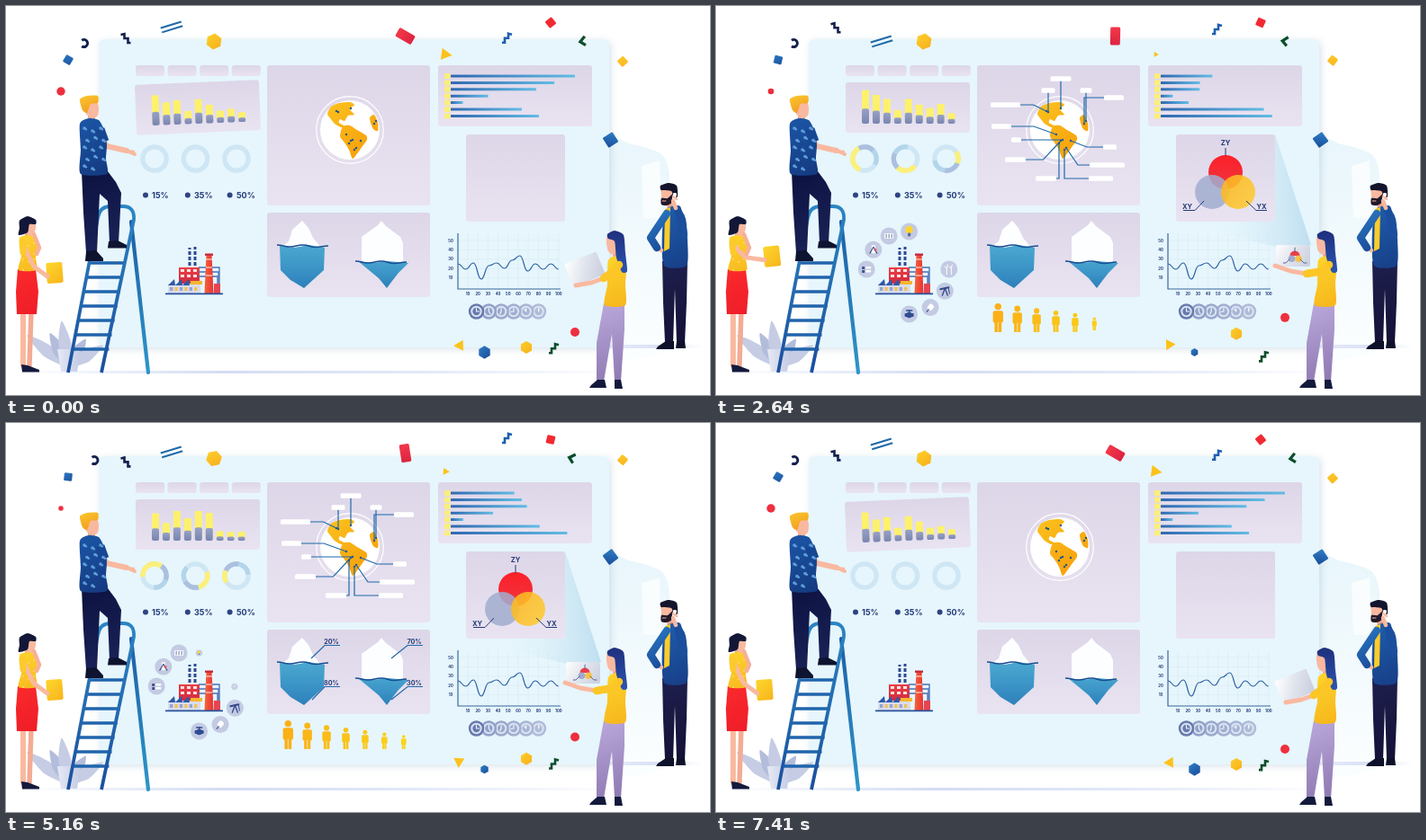
Write an HTML page with a canvas that moves like this. It is 782 px wide and 433 px high and loops after 7.44 s.

```html
<!DOCTYPE html>
<html lang="en">
<head>
<meta charset="utf-8">
<title>Data dashboard</title>
<style>
html, body { margin: 0; width: 100%; height: 100%; overflow: hidden; background: #fff; }
canvas { display: block; width: 782px; height: 433px; }
</style>
</head>
<body>
<canvas id="stage"></canvas>
<script>
const W = 782, H = 433, LOOP = 7440, TAU = Math.PI * 2, RAD = Math.PI / 180;
const canvas = document.getElementById('stage');
const dpr = window.devicePixelRatio || 1;
canvas.width = W * dpr;
canvas.height = H * dpr;
const c = canvas.getContext('2d');
const NAVY = '#243a78', SKIN = '#f9b9a0', LINE = '#1f69a8';

// ---- timing ----
const clamp = x => Math.max(0, Math.min(1, x));
const smooth = x => { x = clamp(x); return x * x * (3 - 2 * x); };
const ramp = (t, a, d) => smooth((t - a) / d);
const pulse = (t, a, da, b, db) => ramp(t, a, da) * (1 - ramp(t, b, db));
const wave = (t, mid, amp, peak = 0, turns = 1) => mid + amp * Math.cos(TAU * turns * (t / LOOP - peak));
const mix = (a, b, p) => a + (b - a) * p;
const mixPt = (a, b, p) => [mix(a[0], b[0], p), mix(a[1], b[1], p)];

// ---- drawing ----
function grad(x0, y0, x1, y1, ...cols) {
  const g = c.createLinearGradient(x0, y0, x1, y1);
  cols.forEach((k, i) => g.addColorStop(i / (cols.length - 1), k));
  return g;
}
function fill(color) { c.fillStyle = color; c.fill(); }
function poly(pts, color) {
  c.beginPath();
  pts.forEach(p => c.lineTo(p[0], p[1]));
  c.closePath();
  fill(color);
}
// closed curve through every point
function blob(pts, color) {
  const n = pts.length, p = i => pts[(i + n) % n];
  c.beginPath();
  c.moveTo(...pts[0]);
  for (let i = 0; i < n; i++) {
    const [a, b, d, e] = [p(i - 1), p(i), p(i + 1), p(i + 2)];
    c.bezierCurveTo(b[0] + (d[0] - a[0]) / 9, b[1] + (d[1] - a[1]) / 9,
      d[0] - (e[0] - b[0]) / 9, d[1] - (e[1] - b[1]) / 9, d[0], d[1]);
  }
  fill(color);
}
function path(pts, color, w, cap = 'round') {
  c.beginPath();
  pts.forEach(p => c.lineTo(p[0], p[1]));
  c.strokeStyle = color; c.lineWidth = w;
  c.lineCap = cap; c.lineJoin = cap === 'round' ? 'round' : 'miter';
  c.stroke();
}
function curve(pts, color, w) {
  c.beginPath();
  c.moveTo(...pts[0]);
  for (let i = 1; i < pts.length; i++) {
    const [a, b] = pts[i - 1], [x, y] = pts[i], m = (a + x) / 2;
    c.bezierCurveTo(m, b, m, y, x, y);
  }
  c.strokeStyle = color; c.lineWidth = w; c.stroke();
}
function partial(pts, p, color, w) {
  const len = pts.slice(1).map((q, i) => Math.hypot(q[0] - pts[i][0], q[1] - pts[i][1]));
  let left = p * len.reduce((a, b) => a + b);
  const out = [pts[0]];
  for (let i = 0; i < len.length && left > 0; i++) {
    out.push(mixPt(pts[i], pts[i + 1], Math.min(1, left / (len[i] || 1))));
    left -= len[i];
  }
  path(out, color, w, 'butt');
}
function disc(x, y, r, color) {
  c.beginPath(); c.arc(x, y, Math.max(0, r), 0, TAU); fill(color);
}
function ring(x, y, r, color, w, a = 0, b = TAU) {
  c.beginPath(); c.arc(x, y, r, a, b);
  c.strokeStyle = color; c.lineWidth = w; c.lineCap = 'butt'; c.stroke();
}
function box(x, y, w, h, r, color) {
  c.beginPath(); c.roundRect(x, y, w, h, r); fill(color);
}
function label(s, x, y, size, align = 'center') {
  c.font = `700 ${size}px Inter, "Open Sans", sans-serif`;
  c.textAlign = align; c.fillStyle = NAVY;
  c.fillText(s, x, y);
}
function at(x, y, deg, scale, draw) {
  if (scale <= 0.01) return;
  c.save();
  c.translate(x, y); c.rotate(deg * RAD); c.scale(scale, scale);
  draw();
  c.restore();
}
function alpha(a, draw) {
  if (a <= 0) return;
  c.save(); c.globalAlpha *= a; draw(); c.restore();
}
const panel = (x, y, w, h) => box(x, y, w, h, 3, grad(0, y, 0, y + h, '#ddd6e8', '#e9e3f1'));

// ---- backdrop ----
function backdrop() {
  c.fillStyle = '#fff'; c.fillRect(0, 0, W, H);
  blob([[660, 157], [695, 154], [728, 165], [737, 190], [737, 290], [740, 380], [660, 380]],
    grad(0, 155, 0, 380, '#e9f6fb', '#fbfeff'));
  poly([[706, 178], [726, 172], [728, 236], [708, 236]], '#f9fdfe');
  box(666, 377, 108, 4, 2, grad(666, 0, 774, 0, '#e7ecf9', '#dbe2f5', '#fff'));
  box(18, 406, 670, 3, 1, grad(18, 0, 688, 0, '#fff', '#d3dcf3', '#e3e9f8', '#fff'));
  c.save();
  c.shadowColor = 'rgba(120,150,180,.28)'; c.shadowBlur = 8; c.shadowOffsetX = 2; c.shadowOffsetY = 2;
  box(103, 37, 567, 343, 6, '#e6f6fc');
  c.restore();
  for (let i = 0; i < 4; i++) panel(144 + i * 35.6, 66, 32, 12);
  panel(290, 66, 181, 156);
  panel(290, 230, 181, 94);
  panel(480, 66, 171, 68);
  panel(511, 143, 110, 97);
}

// ---- charts ----
function columns(t) {
  const tilt = -2.3 * (1 - ramp(t, 1000, 500) + ramp(t, 6700, 600));
  at(213, 113, tilt, 1, () => {
    c.translate(-213, -113);
    panel(144, 85, 138, 56);
    [34, 26, 29, 18, 29, 24, 14, 16, 11].forEach((mean, i) => {
      const late = i > 1 && i < 6;
      const h = wave(t, mean, i === 8 ? 1 : i % 2 ? 7 : 4, late ? .67 : .27), b = h * .45;
      const x = 162 + i * 11.95;
      box(x, 131 - h, 8, h - 2, 1, '#fdf16c');
      box(x, 131 - b, 8, b, 2, grad(0, 131 - b, 0, 131, '#98a2c6', '#7985b0'));
    });
  });
}
function rows(t) {
  [88, 78, 73, 33, 20, 98, 117].forEach((mean, i) => {
    const y = 78 + i * 7.4, peak = i < 4 ? -.06 * i : .1 * i - .05;
    const w = wave(t, mean, i === 4 ? 11 : 20 + 10 * Math.max(0, 3 - i), peak);
    box(487, y - 3, 6.5, 6, 1, '#fcee78');
    box(494, y - 1.5, w, 3, .5, grad(494, 0, 494 + w, 0, '#2f68b0', '#62bce4'));
  });
}
function donuts(t) {
  const on = pulse(t, 300, 900, 6200, 900);
  for (let i = 0; i < 3; i++) {
    const x = 165 + i * 45.5;
    const m = ((1250 - 355 * i) * (t / LOOP - .21) - 5 - 40 * i) * RAD, s = (65 - 18 * i) * RAD * on;
    ring(x, 170, 13.2, '#cfe6f4', 5.2);
    alpha(on, () => {
      ring(x, 170, 13.2, '#b3d5ea', 5.2, m + s, m + s + 2.6);
      ring(x, 170, 13.2, '#adbfdf', 5.2, m + s, m + s + 1.3);
    });
    if (s > .01) ring(x, 170, 13.2, '#fbf07c', 5.6, m - s, m + s);
    disc(155 + i * 46.8, 210.5, 3, '#2f4384');
    label(['15%', '35%', '50%'][i], 162 + i * 47, 213.8, 9, 'left');
  }
}
function lineChart() {
  for (let i = 0; i < 10; i++) {
    const x = 513 + i * 11.2;
    path([[x, 254], [x, 315]], '#d9e9f3', .6);
    label(String(10 + i * 10), x, 321.7, 4.2);
  }
  for (let i = 0; i < 5; i++) {
    const y = 261 + i * 10.4;
    path([[502, y], [615, y]], '#d9e9f3', .6);
    label(String(50 - i * 10), 494, y + 1.5, 4.2);
  }
  path([[502, 253], [502, 315], [616, 315]], '#3b699d', 1.2, 'butt');
  const ys = [287, 293, 286, 304, 289, 286, 292, 283, 278, 295, 287, 293, 287, 293];
  curve(ys.map((y, i) => [502 + i * 8.6, y]), '#2f62a4', 1.2);
  for (let i = 5; i >= 0; i--) {
    const x = 522.5 + i * 13.8;
    disc(x, 340, 8.7, `hsl(224 ${i ? 34 : 30}% ${i ? 66 + i * 2.2 : 54}%)`);
    ring(x, 340, 5.2, '#dbe4f2', 2);
    path([[x, 336.5], [x, 340], [x + 3 * Math.cos(i), 340 + 3 * Math.sin(i)]], '#eef4fb', 1.2);
  }
}

// ---- globe: anchor x, y, label joint x, y, label width ----
const CALLOUTS = [
  [383, 114, 383, 81, 23], [369, 118, 369, 94, 15], [394, 150, 430, 157, 15], [411, 128, 411, 94, 13],
  [409, 131, 431, 102, 22], [378, 143, 328, 134, 22], [383, 150, 344, 171, 23], [389, 158, 415, 177, 39],
  [381, 153, 378, 192, 23], [367, 117, 338, 110, 33], [385, 149, 339, 149, 11], [387, 160, 414, 192, 27]];
function globe(t) {
  ring(382, 138, 37.3, '#fff', 1.2);
  disc(382, 138, 33, '#fff');
  const land = grad(357, 110, 405, 165, '#fbc01d', '#f79f0c');
  blob([[357, 120], [361, 112], [370, 108], [382, 107], [387, 110], [382, 115], [387, 121], [380, 122],
    [376, 128], [371, 126], [370, 130], [377, 134], [372, 135], [365, 131], [361, 126]], land);
  blob([[374, 134], [382, 133], [390, 138], [400, 144], [401, 149], [396, 156], [391, 163], [385, 170],
    [381, 160], [376, 152], [371, 145]], land);
  blob([[404, 124], [409, 121], [413, 130], [413, 139], [408, 137], [405, 130]], land);
  CALLOUTS.forEach(([ax, ay, x, y, w], i) => {
    const p = pulse(t, 850 + i * 70, 600, 5700 + 450 * Math.cos(i * .55), 400);
    const elbow = Math.abs(y - ay) > Math.abs(x - ax) ? ax : (ax + x) / 2;
    disc(ax, ay, 1.2, '#1d5488');
    if (p > .01) partial([[ax, ay], [elbow, y], [x, y]], clamp(p * 1.7), LINE, 1.2);
    const s = clamp((p - .55) / .45) * w;
    const left = x === ax ? x - s / 2 : x < ax ? x - s : x;
    if (s > .1) box(left, y - 2.7, s, 5.4, 1.5, '#fff');
  });
}

// ---- icebergs ----
function icebergs(t) {
  const deep = y => grad(0, y, 0, 314, '#4ba8cf', '#3c95c7', '#2d80ba');
  poly([[306, 268], [314, 262], [318, 249], [329, 239], [336, 247], [341, 258], [349, 268]], '#fdfeff');
  poly([[304, 267], [321, 269], [336, 266], [354, 269], [353, 294], [331, 314], [316, 305], [305, 294]], deep(267));
  poly([[395, 286], [395, 257], [413, 244], [417, 239], [422, 245], [438, 257], [441, 264], [441, 286]], '#fdfeff');
  poly([[391, 284], [407, 286], [424, 284], [447, 286], [436, 297], [429, 306], [423, 314], [414, 303]], deep(280));
  [[301, 267], [388, 285]].forEach(([x, y]) => curve([[x, y - 1], [x + 14, y + 1], [x + 29, y - 1], [x + 43, y + 1.5], [x + 57, y]], '#174e92', 1.5));
  const p = pulse(t, 3850, 760, 6300, 700);
  if (p > .01) [[339, 262, '20%'], [340, 308, '80%'], [428, 262, '70%'], [428, 308, '30%']].forEach(([x, y, s], i) => {
    const ex = i < 2 ? 354 : 446;
    partial([[x, y], [ex, y - 14.5], [ex + 17, y - 14.5]], p, LINE, 1.2);
    alpha(clamp(p * 4 - 3), () => label(s, ex + 7.5, y - 16.5, 7.2));
  });
}

// ---- row of people ----
function crowd(t) {
  for (let i = 0; i < 7; i++) {
    const h = 32 - 2.7 * i, p = pulse(t, 940 + i * 300, 290, 5390 + i * 250, 240);
    at(313.3 + i * 21.4, 363 - h / 2, 0, p * h / 31, () => {
      const col = `hsl(${40 + i * 1.6} 97% 54%)`;
      disc(0, -12, 3.6, col);
      box(-5.5, -7.5, 11, 13, 2, col);
      box(-3.8, 0, 7.6, 15.5, 1, col);
      path([[0, 5], [0, 15]], '#e6f6fc', .7);
    });
  }
}

// ---- factory ----
function factory() {
  [204, 210].forEach((x, i) => {
    path([[x, 269 - i], [x, 306]], '#2c4a94', 3, 'butt');
    for (let y = 272; y < 296; y += 6) path([[x - 2, y], [x + 2, y]], '#e6f6fc', 2, 'butt');
  });
  box(192, 291, 23, 18, 0, grad(0, 290, 0, 308, '#ee3f46', '#d32c40'));
  for (let i = 0; i < 6; i++) box(194 + i % 3 * 7, 293 + Math.floor(i / 3) * 6, 4, 3, 0, '#fbe3e0');
  for (let i = 0; i < 3; i++) path([[214, 291 + i * 5], [237 - i, 291 + i * 5], [237 - i, 309]], '#4a6fb5', 1.3, 'butt');
  poly([[222.5, 276], [228.5, 276], [230.5, 320], [220.5, 320]], grad(220, 0, 231, 0, '#f8663a', '#e62f34'));
  [282, 291, 300].forEach(y => path([[222, y], [229, y]], '#fbd6c8', 1.2, 'butt'));
  box(221, 275.5, 9, 2.4, 0, '#c52b3d');
  box(180, 309, 36, 11, 0, '#d9dcec');
  for (let x = 180; x < 200; x += 8) poly([[x, 311], [x + 7, 304], [x + 8, 311]], '#2f59a8');
  for (let i = 0; i < 6; i++) box(182 + i * 5.4, 313, 3.4, 4, 0, i % 2 ? '#f3c25a' : '#98a5cc');
  box(205, 306, 13, 4, 0, '#f5b62f');
  box(231, 309, 7, 11, 0, '#e54450');
  box(177, 319.5, 64, 1.8, 0, '#28509c');
}
const GLYPHS = [
  () => { disc(0, -2, 4.2, '#fdd52f'); box(-1.6, 1.5, 3.2, 4, 1, '#5b6b9f'); },
  () => { box(-5, -3, 10, 6, 1, '#fff'); [-3, 0, 3].forEach(x => path([[x, -2], [x, 2]], '#6a79ab', 1)); },
  () => { box(-2, -5, 4, 9, 1, '#fff'); path([[-4, 4], [0, -3], [4, 4]], '#405391', 1.2); disc(2, 0, 1.5, '#e25f5a'); },
  () => { [-3, 1].forEach(y => { box(-5, y, 3, 3, 0, '#405391'); box(-1, y, 6, 2.5, 0, '#fff'); }); },
  () => { box(-5, -1, 10, 4, 1, '#2f4d94'); disc(0, 1, 3.2, '#2f4d94'); path([[-3, -4], [3, -4]], '#2f4d94', 1.5); path([[0, -4], [0, 0]], '#2f4d94', 1.5); },
  () => at(0, 0, 40, 1, () => { box(-3, -4, 6, 7, 2, '#fff'); path([[0, 3], [0, 6]], '#56679f', 1.4); }),
  () => { path([[-5, -2], [4, -4]], '#34488a', 2); path([[-3, 5], [0, -3], [3, 5]], '#34488a', 1.3); path([[4, -3], [5, 3]], '#34488a', 1); },
  () => [-2.5, 2.5].forEach(x => { path([[x, 6], [x, -1]], '#fff', 1); path([[x - 2.5, -3], [x, -1], [x + 1, -5]], '#fff', 1); })];
function icons(t) {
  GLYPHS.forEach((glyph, i) => {
    const order = i < 4 ? i : 7 - i;
    const angle = (i < 4 ? -88 - 29 * i : 88 - 31 * (i - 4)) * RAD;
    const p = pulse(t, 950 + order * 270, 350, 4950 + order * 480, 360), r = mix(38, 46, p);
    at(213 + r * Math.cos(angle), 297 + r * Math.sin(angle), 0, p, () => { disc(0, 0, 9.5, '#c3cae2'); glyph(); });
  });
}

// ---- overlapping circles and projector beam ----
function venn(t) {
  at(566, 198, 0, pulse(t, 1680, 500, 5350, 450), () => {
    disc(0, -13, 19, grad(0, -32, 0, 6, '#fb2029', '#f0353f'));
    alpha(.85, () => disc(-15, 9, 19, '#a3add1'));
    alpha(.88, () => disc(14, 9, 19, grad(-4, 0, 30, 20, '#fdb820', '#fdca34')));
  });
  const p = pulse(t, 2000, 500, 5300, 350);
  if (p < .01) return;
  partial([[566, 167], [566, 158]], p, NAVY, 1);
  partial([[542, 217], [532, 227.5], [519, 227.5]], p, NAVY, 1);
  partial([[589, 217], [600, 227.5], [612, 227.5]], p, NAVY, 1);
  alpha(p, () => { label('ZY', 566, 155.3, 7.6); label('XY', 523.5, 225.8, 7.6); label('YX', 606, 225.8, 7.6); });
}
function beam(t) {
  alpha(pulse(t, 1050, 400, 5400, 400), () =>
    poly([[511, 240], [621, 240], [621, 143], [661, 266], [622, 268]],
      grad(662, 245, 560, 250, 'rgba(160,205,230,.6)', 'rgba(225,242,250,.1)')));
}

// ---- confetti ----
const zigzag = color => path([[-5, -4], [-1, -5], [-1, 0], [3, 0], [3, 5], [6, 5]], color, 2.6, 'butt');
const mirrored = color => { c.scale(-1, 1); zigzag(color); };
const square = (s, color) => box(-s / 2, -s / 2, s, s, 1.2, color);
const triangle = r => poly([[-r * .8, -r], [r, 0], [-r * .8, r]], '#fcc21b');
const hex = (r, color) => poly(Array.from({ length: 6 }, (_, i) => [r * Math.sin(i * TAU / 6), r * Math.cos(i * TAU / 6)]), color);
function confetti(t) {
  const w = (...args) => wave(t, ...args);
  const blue = grad(-6, -6, 6, 6, '#2d7cc4', '#1b4f9c');
  const gold = grad(-8, -8, 8, 8, '#fdd02a', '#f8ae1c');
  at(w(90, 8, .68), 41.5, 0, 1, () => ring(0, 0, 4, '#14204e', 3, -2.2, 2.2));
  at(69, 60, w(17, 14, 0, 2), 1, () => square(9, blue));
  disc(61, 95, w(3.6, 1.1, 0, 2), '#ee2f3e');
  at(132.5, w(34, 11, .78), 0, 1, () => zigzag('#14204e'));
  at(184, w(32, 9, .45), -17, 1, () => [-2.5, 2.5].forEach(y => path([[-12, y], [12, y]], LINE, 2, 'butt')));
  at(231, 39.5, w(11, 8, .65), 1, () => hex(9, gold));
  at(443.5, 33.5, w(68, 38, .5), 1, () => box(-10, -5.5, 20, 11, 1.5, grad(-10, 0, 10, 0, '#f3384a', '#dd2440')));
  at(489, 54, w(4, 4), w(.67, .33, -.02), () => triangle(6.6));
  at(557, w(26, 10, -.02, 2), 0, 1, () => mirrored('#1f5fae'));
  at(605, 18.5, w(30, 21, 0, 2), 1, () => square(9.2, '#f12a32'));
  at(w(634, 7, 0, 2), 39.5, w(-10, -14, 0, 2), 1, () => path([[4, -4.5], [-3, -1], [1, 5]], '#0d4d2b', 3.2, 'butt'));
  at(685, w(55, 14, .17), w(42, 6), 1, () => square(9, gold));
  at(671.5, 149, w(29, 28, 0, 3), 1, () => square(13, blue));
  at(503, 378, w(130, 48, 0, 2), 1, () => triangle(6));
  at(531.5, 385.5, 0, w(.76, .24), () => hex(7.2, blue));
  at(578, w(372.5, 8.5, -.08), 0, 1, () => hex(7, gold));
  at(609, w(384, 6.5, .32), 0, 1, () => mirrored('#0d4d2b'));
  disc(632, w(353, 10), 5, '#ee2f3e');
}

// ---- people ----
function ladder() {
  [-52, -28, -8, 32, 58].forEach((deg, i) => at(69, 402, deg, 1, () => {
    const h = 58 - 12 * (i % 2) - 3 * i;
    blob([[0, 0], [-7, -h * .5], [0, -h], [7, -h * .5]], i % 2 ? '#b3bcda' : '#c5cce4');
  }));
  poly([[57, 382], [83, 382], [79, 407], [61, 407]], grad(57, 0, 83, 0, '#e6e9f5', '#c3cbe4'));
  path([[139, 240], [158, 408]], grad(0, 235, 0, 408, '#1d5ca6', '#2d96c8'), 4.2);
  for (let i = 0; i < 7; i++) {
    const y = 286 + i * 16, x = 92 - i * 3.1;
    path([[x, y], [x + 41, y]], '#2064ac', 3.4, 'butt');
  }
  c.beginPath();
  c.moveTo(69, 408); c.lineTo(102, 236);
  c.quadraticCurveTo(104, 223, 116, 223); c.lineTo(130, 223);
  c.quadraticCurveTo(143, 223, 142, 238); c.lineTo(106, 408);
  c.strokeStyle = grad(0, 222, 0, 408, '#2c86c4', '#1b4f9e'); c.lineWidth = 3.8; c.stroke();
}
function climber(t) {
  const up = pulse(t, 800, 500, 1750, 600);
  poly([[84, 184], [113, 184], [122, 196], [128, 208], [125, 264], [115, 264], [113, 217], [104, 209], [101, 275], [89, 275], [86, 230]],
    grad(84, 186, 125, 270, '#0d1240', '#1a2358'));
  poly([[89, 273], [100, 272], [108, 281], [108, 284], [88, 284]], '#0e1330');
  poly([[114, 262], [124, 261], [134, 266], [134, 269.5], [113, 269.5]], '#0e1330');
  path([[95, 120], [95, 128]], '#f2a88f', 8);
  blob([[88, 107], [100, 105], [103, 113], [102, 122], [96, 125], [89, 120]], SKIN);
  blob([[82, 104], [90, 100], [102, 100], [102, 108], [94, 109], [90, 119], [85, 116]], grad(82, 100, 90, 122, '#fcc52d', '#f09b1e'));
  const elbow = mixPt([112, 156], [113, 152], up), wrist = mixPt([134, 161], [137, 148], up), hand = mixPt([143, 165], [152, 142], up);
  path([[106, 147], elbow, wrist], SKIN, 6);
  path([wrist, hand], SKIN, 4);
  path([wrist, [hand[0] - 1, hand[1] - 3]], SKIN, 2.5);
  blob([[82, 131], [92, 125], [103, 127], [109, 138], [112, 154], [111, 170], [112, 187], [83, 187], [83, 160]],
    grad(82, 125, 112, 188, '#1c56a6', '#143a80'));
  path([[104, 137], [109, 151]], '#174792', 11, 'butt');
  for (let i = 0; i < 14; i++) {
    const row = Math.floor(i / 3), x = 87 + i % 3 * 9 + row % 2 * 3, y = 136 + row * 10.5 + i % 2 * 3;
    disc(x, y, 1.8, '#5e9fdb');
    disc(x + 1.8, y + 1.2, 1.3, '#5e9fdb');
  }
}
function reader(t) {
  const up = pulse(t, 800, 650, 1950, 1400);
  const paper = mixPt([54, 297], [70, 261], up);
  path([[19, 340], [19, 400]], SKIN, 6);
  path([[28, 340], [26, 400]], '#f4ab93', 5.5);
  poly([[17, 399], [24, 400], [37, 405], [37, 407.5], [18, 407.5]], '#141a3c');
  poly([[13, 293], [33, 293], [36, 318], [34, 343], [12, 343], [11, 318]], grad(11, 293, 36, 343, '#fb2a2c', '#ee1d28'));
  path([[25, 250], [24, 260]], '#f2a88f', 7);
  blob([[15, 258], [27, 255], [35, 262], [33, 280], [34, 294], [14, 294], [17, 278]], grad(14, 255, 36, 295, '#fdd42e', '#f8b820'));
  for (let i = 0; i < 10; i++) disc(19 + i % 3 * 6, 264 + Math.floor(i / 3) * 9 + i % 2 * 3, .8, '#fdeb92');
  blob([[22, 240], [32, 239], [33, 248], [29, 256], [23, 253]], SKIN);
  blob([[15, 239], [24, 234], [33, 238], [33, 243], [26, 243], [24, 252], [14, 255], [15, 247]], '#121737');
  at(paper[0], paper[1], mix(-4, -8, up), 1, () => box(-9, -11.5, 18, 23, 2, grad(-9, -11, 9, 11, '#fdd62c', '#f7b51c')));
  path([[19, 266], mixPt([31, 290], [34, 270], up), [paper[0] - 8, paper[1] + 4]], SKIN, 5);
  path([[18, 263], [19, 274]], '#fcca2b', 7);
  path([[34, 276], [37, 269], [31, 254]], '#f7b097', 4.5);
}
function presenter(t) {
  const up = pulse(t, 750, 500, 6400, 700);
  poly([[664, 331], [687, 331], [687, 360], [683, 418], [676, 418], [673, 365], [664, 418], [656, 418], [656, 375]],
    grad(656, 331, 686, 418, '#bba8dc', '#8d79b0'));
  poly([[657, 416], [665, 416], [667, 425], [648, 425], [650, 422]], '#141a3c');
  poly([[676, 416], [683, 416], [685, 426], [676, 426]], '#141a3c');
  path([[677, 270], [678, 282]], '#f0a58d', 7);
  blob([[668, 256], [679, 254], [681, 269], [675, 277], [669, 273], [667, 264]], SKIN);
  blob([[669, 283], [680, 278], [689, 288], [688, 310], [688, 333], [665, 333], [668, 310]], grad(666, 280, 688, 333, '#fdd32b', '#f7b71d'));
  blob([[668, 254], [676, 250], [686, 255], [688, 275], [690, 295], [684, 296], [678, 280], [676, 262], [669, 259]],
    grad(0, 250, 0, 297, '#1f2f7d', '#2a55b0'));
  at(mix(643, 641, up), mix(293, 278, up), mix(-22, 0, up), 1, () => {
    const h = mix(27, 24, up);
    box(-19, -h / 2, 38, h, 2, grad(-19, -12, 19, 12, '#fff', '#dfe3ec', '#c9cedd'));
    alpha(clamp(up * 2 - 1), () => {
      c.beginPath(); c.arc(2, 0, 5.5, Math.PI, 0); fill('#e8404a');
      disc(-1.5, 3.2, 3.8, 'rgba(150,160,202,.85)');
      disc(6, 3.2, 3.8, 'rgba(250,190,55,.9)');
      [-1, 1].forEach(s => path([[2 + 13 * s, 8], [2 + 10 * s, 8], [2 + 6 * s, 4]], NAVY, .7));
      path([[2, -9], [2, -5]], NAVY, .7);
    });
  });
  const elbow = mixPt([664, 303], [656, 298], up), hand = mixPt([633, 311], [621, 289], up);
  path([elbow, mixPt([650, 308], [638, 295], up), hand], SKIN, 5);
  path([[681, 288], [675, 295], elbow], '#fcc626', 8.5);
}
function caller(t) {
  const think = pulse(t, 900, 500, 1750, 600);
  poly([[729, 284], [757, 284], [756, 330], [754, 375], [745, 375], [743, 315], [741, 375], [732, 375], [730, 330]],
    grad(729, 284, 757, 375, '#1e1f4e', '#141136'));
  poly([[733, 373], [742, 373], [742, 382], [722, 382], [724, 379]], '#0d1129');
  poly([[745, 373], [754, 373], [755, 381], [744, 381]], '#0d1129');
  path([[738, 218], [738, 228]], '#e99f88', 7);
  blob([[734, 226], [747, 223], [755, 237], [757, 260], [756, 289], [731, 289], [729, 250]], grad(728, 225, 757, 290, '#1f5dab', '#173f88'));
  poly([[732, 226], [738, 224], [737, 270], [731, 273]], '#fdcc2b');
  blob([[728, 203], [740, 200], [743, 212], [739, 221], [729, 220], [728, 210]], SKIN);
  blob([[728, 214], [735, 214], [742, 208], [741, 218], [734, 222], [728, 221]], '#20182b');
  path([[729, 217], [733, 217]], '#f3b09a', 1);
  blob([[727, 200], [736, 197], [745, 200], [746, 212], [742, 214], [739, 206], [728, 205]], '#14142c');
  path([[750, 235], [753, 254], mixPt([746, 226], [753, 268], think)], '#1b4e9c', 8);
  alpha(1 - think, () => {
    at(742, 214, 12, 1, () => box(-2, -6, 4, 12, 1, '#fff'));
    path([[744, 225], [741, 217]], SKIN, 4.5);
    path([[741, 212], [745, 215]], SKIN, 2.5);
  });
  const cuff = mixPt([723, 269], [724, 239], think), hand = mixPt([728, 272], [727, 224], think);
  path([cuff, hand], SKIN, 4.5);
  path([[734, 231], [716, 258], cuff], grad(712, 230, 734, 270, '#2a78c2', '#1a4c9a'), 8.5);
}

const LAYERS = [backdrop, columns, rows, donuts, globe, icebergs, crowd, factory, icons, lineChart,
  venn, beam, confetti, ladder, climber, reader, presenter, caller];
const start = performance.now();
function tick() {
  const t = (performance.now() - start) % LOOP;
  c.setTransform(dpr, 0, 0, dpr, 0, 0);
  LAYERS.forEach(draw => draw(t));
  requestAnimationFrame(tick);
}
tick();
</script>
</body>
</html>
```
